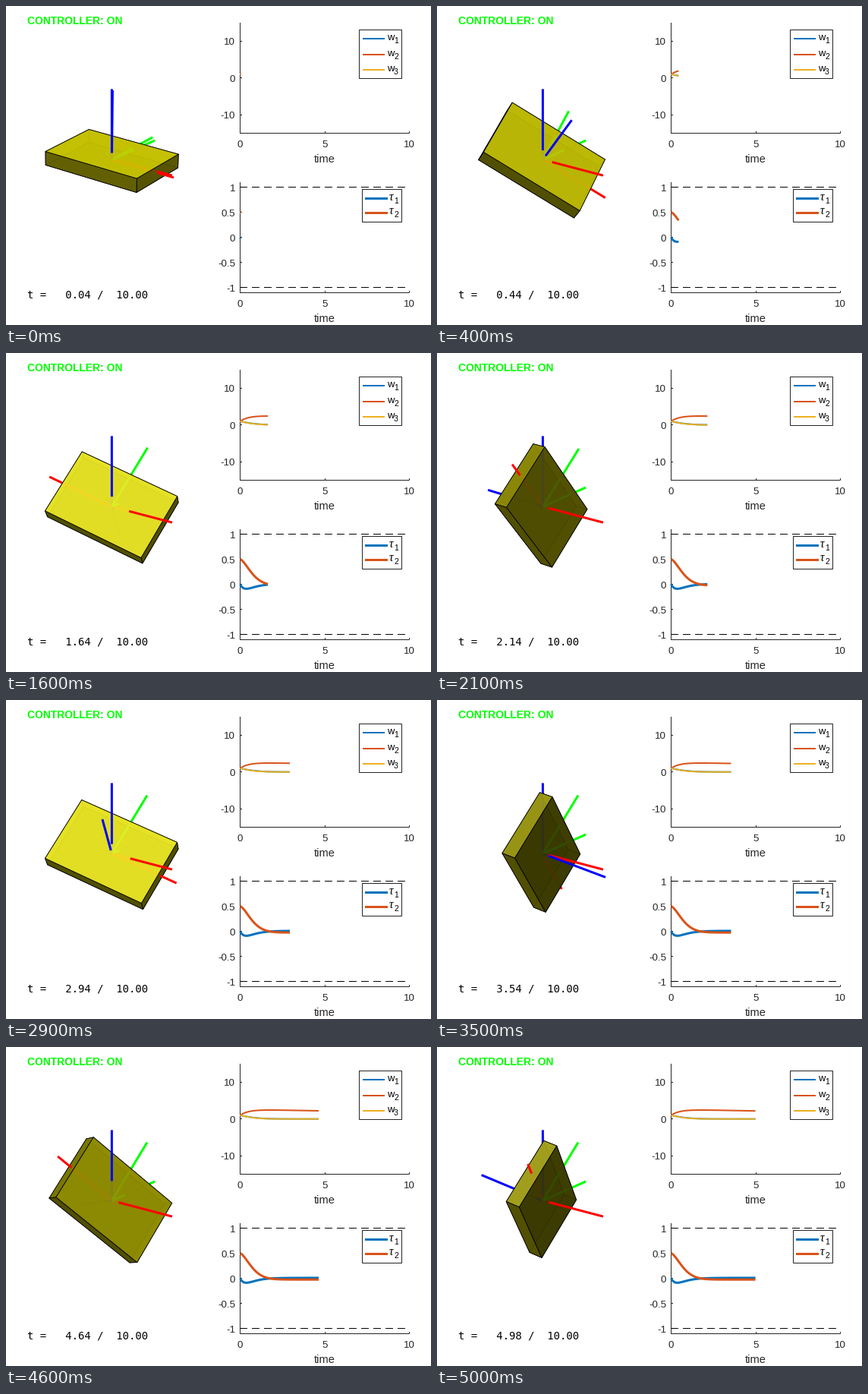
A matplotlib script that plays this animation: 560x420 px, repeating every 5.1 s.

```python
import numpy as np
import matplotlib.pyplot as plt
from matplotlib.animation import FuncAnimation
from matplotlib.patches import Polygon, Rectangle

W, H, DPI = 560, 420, 100
FRAMES, INTERVAL = 51, 100
PT = 72 / DPI                      # points per pixel
INK = (0.15, 0.15, 0.15)
BLUE, ORANGE, YELLOW = "#0072BD", "#D95319", "#EDB120"
AXIS_COLORS = ("#ff0000", "#00ff00", "#0000ff")

times = [min(0.04 + 0.1 * k, 4.98) for k in range(FRAMES)]


# ---------- signals ----------

def spin(t):
    """Body rates w1, w2, w3."""
    return np.array([
        np.exp(-1.05 * t - 0.25 * t**2),
        2.6185 - 0.088 * t - 1.6185 * np.exp(-t / 0.493),
        np.exp(-1.15 * t - 0.35 * t**2),
    ])


def torque(t):
    return np.array([
        -0.64 * t * np.exp(-t / 0.38) + 0.012 * (1 - np.exp(-t)),
        0.522 * np.exp(-(t / 0.84) ** 1.55) - 0.022,
    ])


# ---------- attitude ----------

def rot(v):
    """Rotation matrix of a rotation vector."""
    angle = np.linalg.norm(v)
    if angle < 1e-9:
        return np.eye(3)
    x, y, z = v / angle
    k = np.array([[0, -z, y], [z, 0, -x], [-y, x, 0]])
    return np.eye(3) + np.sin(angle) * k + (1 - np.cos(angle)) * k @ k


def rot_vector(m):
    angle = np.arccos(np.clip((np.trace(m) - 1) / 2, -1, 1))
    axis = np.array([m[2, 1] - m[1, 2], m[0, 2] - m[2, 0], m[1, 0] - m[0, 1]])
    size = np.linalg.norm(axis)
    return axis * angle / size if size > 1e-9 else np.zeros(3)


def integrate(stops, step=0.004):
    r, now, out = np.eye(3), 0.0, []
    for stop in stops:
        n = max(1, int(round((stop - now) / step)))
        dt = (stop - now) / n
        for i in range(n):
            r = r @ rot(spin(now + (i + 0.5) * dt) * dt)
        now = stop
        out.append(r)
    return out


def frame_from(x, y):
    """Attitude whose x axis is exact and whose y axis is made square to it."""
    x = np.array(x) / np.linalg.norm(x)
    y = np.array(y) - x * (x @ y)
    y /= np.linalg.norm(y)
    return np.column_stack([x, y, np.cross(x, y)])


MID_TURN = frame_from((0.003, 0.647, -0.761), (-0.135, 0.761, 0.646))
SETTLED = frame_from((0.944, 0.184, -0.261), (0.029, 0.766, 0.642))


def ease(t, start, end):
    s = np.clip((t - start) / (end - start), 0, 1)
    return s * s * (3 - 2 * s)


def attitudes():
    """Integrated motion, steered gently through the two key attitudes."""
    free = integrate(times)
    mid = rot_vector(MID_TURN @ free[8].T)
    late = rot_vector(SETTLED @ free[29].T)
    return [rot(mid * ease(t, 0, 0.84) + (late - mid) * ease(t, 0.84, 1.8)) @ r
            for t, r in zip(times, free)]


poses = attitudes()

# ---------- camera ----------

AZ, EL = np.radians(37.5), np.radians(20)
RIGHT = np.array([np.cos(AZ), np.sin(AZ), 0])
UP = np.array([-np.sin(AZ) * np.sin(EL), np.cos(AZ) * np.sin(EL), np.cos(EL)])
VIEW = np.cross(RIGHT, UP)
SCALE, DIST = 97, 18
CENTER = (139.4, 202.3)

LIGHT = np.array([0.15, -0.35, 0.92])
HALFWAY = (LIGHT + VIEW) / np.linalg.norm(LIGHT + VIEW)


def project(points):
    p = np.atleast_2d(points)
    s = SCALE / (1 - p @ VIEW / DIST)
    return np.column_stack([CENTER[0] + s * (p @ RIGHT),
                            CENTER[1] - s * (p @ UP)])


# ---------- box ----------

HALF = np.array([0.75, 0.5, 0.1])


def face_corners(axis, sign):
    a, b = [i for i in range(3) if i != axis]
    out = np.zeros((4, 3))
    out[:, axis] = sign
    out[:, a] = [-1, 1, 1, -1]
    out[:, b] = [-1, -1, 1, 1]
    return out * HALF


FACES = [(axis, sign) for axis in range(3) for sign in (-1, 1)]


def shade(normal, axis):
    base, gain = (0.22, 0.63) if axis == 2 else (0.32, 0.24)
    level = base + gain * max(0, normal @ LIGHT)
    shine = 0.16 * max(0, normal @ HALFWAY) ** 20
    return (min(1, level + shine), min(1, 0.98 * level + shine), shine, 0.9)


def faces_camera(normal, axis):
    return normal @ VIEW * DIST > HALF[axis]


# ---------- stage ----------

fig = plt.figure(figsize=(W / DPI, H / DPI), dpi=DPI, facecolor="white")
ax = fig.add_axes([0, 0, 1, 1])
ax.set_xlim(0, W)
ax.set_ylim(H, 0)
ax.axis("off")


def line(xs, ys, color, width, z=2, **kw):
    kw.setdefault("solid_capstyle", "butt")
    return ax.plot(xs, ys, color=color, lw=width * PT, zorder=z, snap=False,
                   **kw)[0]


def text(x, y, s, px, font="Liberation Sans", color=INK, ha="left",
         va="baseline", **kw):
    return ax.text(x, y, s, fontsize=px * PT, family=font, color=color,
                   ha=ha, va=va, zorder=20, **kw)


X0, X1 = 308.5, 531.5


def to_x(t):
    return X0 + t * (X1 - X0) / 10


def crisp(v):
    """Centre of the pixel that holds v."""
    return np.floor(v) + 0.5


def chart(top, bottom, ticks, limit):
    """Draw the axes and return the value-to-pixel mapping."""
    mid, unit = (top + bottom) / 2, (bottom - top) / 2 / limit

    def to_y(v):
        return mid - v * unit

    line([X0, X0, X1], [top, bottom, bottom], INK, 1)
    for t in (0, 5, 10):
        line([crisp(to_x(t))] * 2, [bottom, bottom - 2.5], INK, 1)
        text(to_x(t), bottom + 19, str(t), 13.33, ha="center")
    for v in ticks:
        line([X0, X0 + 2.5], [crisp(to_y(v))] * 2, INK, 1)
        text(302, to_y(v) + 5, f"{v:g}", 13.33, ha="right")
    text(420, bottom + 38.5, "time", 14.67, ha="center")
    return to_y


def legend(box, rows, xs, colors, width, symbol, text_x, sub_x, **style):
    left, top, right, bottom = box
    ax.add_patch(Rectangle((left, top), right - left, bottom - top, fc="white",
                           ec=INK, lw=PT, zorder=10, snap=False))
    for i, (y, color) in enumerate(zip(rows, colors), 1):
        line(xs, [y, y], color, width, z=11)
        text(text_x, y + 2, symbol, color="black", **style)
        text(sub_x, y + 6, str(i), 10.5, color="black")


rate_y = chart(22, 167.5, (-10, 0, 10), 15)
torque_y = chart(232, 377.5, (-1, -0.5, 0, 0.5, 1), 1.1)

for v in (-1, 1):
    line([X0 - 0.5, X1], [crisp(torque_y(v))] * 2, "black", 1,
         dashes=(10, 6), dash_capstyle="butt")

legend((465.5, 31.5, 521.5, 95.5), (43, 64, 84), (470, 499),
       (BLUE, ORANGE, YELLOW), 2, "w", 502, 511, px=13)
legend((469.5, 241.5, 521.5, 284.5), (253.5, 272.5), (473, 503),
       (BLUE, ORANGE), 3, "\u03c4", 505, 511, px=15.5,
       font="Liberation Serif", style="italic")

text(28, 24, "CONTROLLER: ON", 13.9, color="#00ff00", weight="bold")
clock = text(28, 384, "", 14, font="DejaVu Sans Mono", color="black")

rate_lines = [line([], [], c, 2, z=4) for c in (BLUE, ORANGE, YELLOW)]
torque_lines = [line([], [], c, 3, z=4) for c in (BLUE, ORANGE)]

face_patches = [ax.add_patch(Polygon(np.zeros((4, 2)), ec="black", lw=0.8 * PT,
                                     joinstyle="round")) for _ in FACES]
# Six arrows: three fixed, three on the box; each has a part inside and outside.
inner = [line([], [], AXIS_COLORS[i % 3], 3) for i in range(6)]
outer = [line([], [], AXIS_COLORS[i % 3], 3) for i in range(6)]

BACK_AXIS, BACK_FACE, INSIDE, FRONT_FACE, FRONT_AXIS = 3, 4, 5, 6, 7


def draw_box(r):
    for patch, (axis, sign) in zip(face_patches, FACES):
        normal = r[:, axis] * sign
        patch.set_xy(project(face_corners(axis, sign) @ r.T))
        patch.set_facecolor(shade(normal, axis))
        front = faces_camera(normal, axis)
        patch.set_zorder(FRONT_FACE if front else BACK_FACE)


def draw_arrows(r):
    tips = np.vstack([np.eye(3), r.T])
    for tip, a, b in zip(tips, inner, outer):
        local = r.T @ tip
        reach = HALF / np.maximum(np.abs(local), 1e-9)
        axis = int(np.argmin(reach))
        exit_point = tip * reach[axis]
        normal = r[:, axis] * np.sign(local[axis])
        a.set_data(*project([np.zeros(3), exit_point]).T)
        b.set_data(*project([exit_point, tip]).T)
        a.set_zorder(INSIDE)
        front = faces_camera(normal, axis)
        b.set_zorder(FRONT_AXIS if front else BACK_AXIS)


def update(k):
    t = times[k]
    draw_box(poses[k])
    draw_arrows(poses[k])
    ts = np.linspace(0, t, 2 + int(t * 40))
    for ln, values in zip(rate_lines, spin(ts)):
        ln.set_data(to_x(ts), rate_y(values))
    for ln, values in zip(torque_lines, torque(ts)):
        ln.set_data(to_x(ts), torque_y(values))
    clock.set_text(f"t = {t:6.2f} / {10:6.2f}")
    return []


anim = FuncAnimation(fig, update, frames=FRAMES, interval=INTERVAL,
                     init_func=lambda: update(0), repeat=True, repeat_delay=0,
                     blit=False)
plt.show()
```
